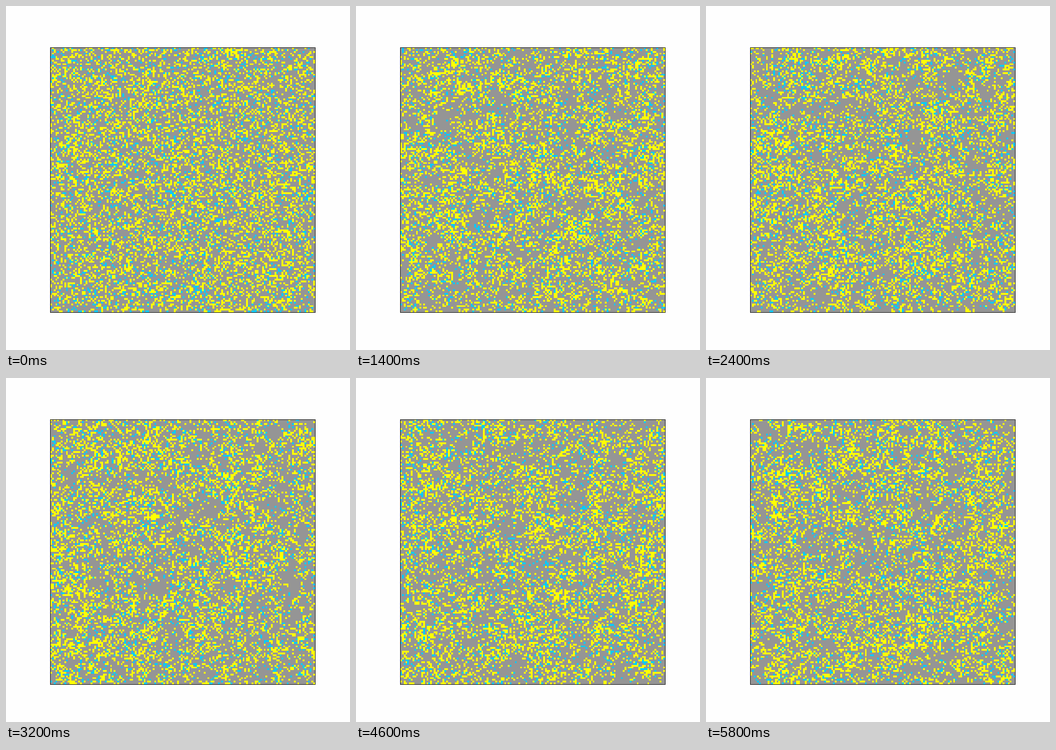
Recreate the animation shown at these times as an HTML page with a canvas. Size 748x748 px, loop 6000 ms.

```html
<!DOCTYPE html>
<html lang="en">
<head>
<meta charset="utf-8">
<title>Cell grid</title>
<style>
  html, body { margin: 0; width: 100%; height: 100%; overflow: hidden; background: #fefefe; }
  canvas { display: block; }
</style>
</head>
<body>
<canvas id="stage" width="748" height="748"></canvas>
<script>
const N = 150, SIZE = 576, LEFT = 96, TOP = 90;
const LOOP = 6000, STEP = 200, STATES = 29;
const EMPTY = 0, ACTIVE = 1, RESTING = 2;
const COLORS = ['#959595', '#ffff00', '#00ccff'];
const DENSITY = 0.255, DEATH = 0.8, REST = 0.18, WAKE = 0.45;
const REACH = 2, CROWDING = 1.4;

let seed = 20417;
function random() {
  seed = (seed + 0x6D2B79F5) | 0;
  let t = Math.imul(seed ^ (seed >>> 15), 1 | seed);
  t = (t + Math.imul(t ^ (t >>> 7), 61 | t)) ^ t;
  return ((t ^ (t >>> 14)) >>> 0) / 4294967296;
}

function firstState() {
  return Uint8Array.from({ length: N * N }, () => {
    const r = random();
    return r < 0.27 ? ACTIVE : r < 0.355 ? RESTING : EMPTY;
  });
}

function countNeighbours(cells, i) {
  const x = i % N, y = (i - x) / N;
  let count = 0;
  for (let dy = -REACH; dy <= REACH; dy++) {
    const row = (y + dy + N) % N * N;
    for (let dx = -REACH; dx <= REACH; dx++) {
      if (cells[row + (x + dx + N) % N] === ACTIVE) count++;
    }
  }
  return count;
}

// Active cells die at random; births, likelier in crowds, restore the overall density.
function nextState(cells) {
  const next = new Uint8Array(N * N), chance = new Float32Array(N * N);
  let alive = 0, total = 0;
  cells.forEach((cell, i) => {
    if (cell === ACTIVE) {
      if (random() >= DEATH) { next[i] = ACTIVE; alive++; }
      else if (random() < REST) next[i] = RESTING;
    } else if (cell === RESTING) {
      if (random() >= WAKE) next[i] = RESTING;
    } else {
      chance[i] = 1 + countNeighbours(cells, i) ** CROWDING;
      total += chance[i];
    }
  });
  const rate = (DENSITY * N * N - alive) / total;
  chance.forEach((weight, i) => {
    if (weight && random() < weight * rate) next[i] = ACTIVE;
  });
  return next;
}

const states = [firstState()];
while (states.length < STATES) states.push(nextState(states[states.length - 1]));

const ctx = document.getElementById('stage').getContext('2d');
const edge = k => Math.round(k * SIZE / N);

function draw(cells) {
  ctx.fillStyle = '#fefefe';
  ctx.fillRect(0, 0, 748, 748);
  ctx.fillStyle = COLORS[EMPTY];
  ctx.fillRect(LEFT, TOP, SIZE, SIZE);
  for (const kind of [ACTIVE, RESTING]) {
    ctx.fillStyle = COLORS[kind];
    cells.forEach((cell, i) => {
      if (cell !== kind) return;
      const x = i % N, y = (i - x) / N;
      ctx.fillRect(LEFT + edge(x), TOP + edge(y), edge(x + 1) - edge(x), edge(y + 1) - edge(y));
    });
  }
  ctx.strokeStyle = '#000';
  ctx.strokeRect(LEFT + 0.5, TOP + 0.5, SIZE, SIZE);
}

const start = performance.now();
let shown = -1;
function tick() {
  const time = (performance.now() - start) % LOOP;
  // The opening state holds for two steps.
  const index = Math.max(0, Math.floor(time / STEP) - 1);
  if (index !== shown) draw(states[shown = index]);
  requestAnimationFrame(tick);
}
tick();
</script>
</body>
</html>
```
